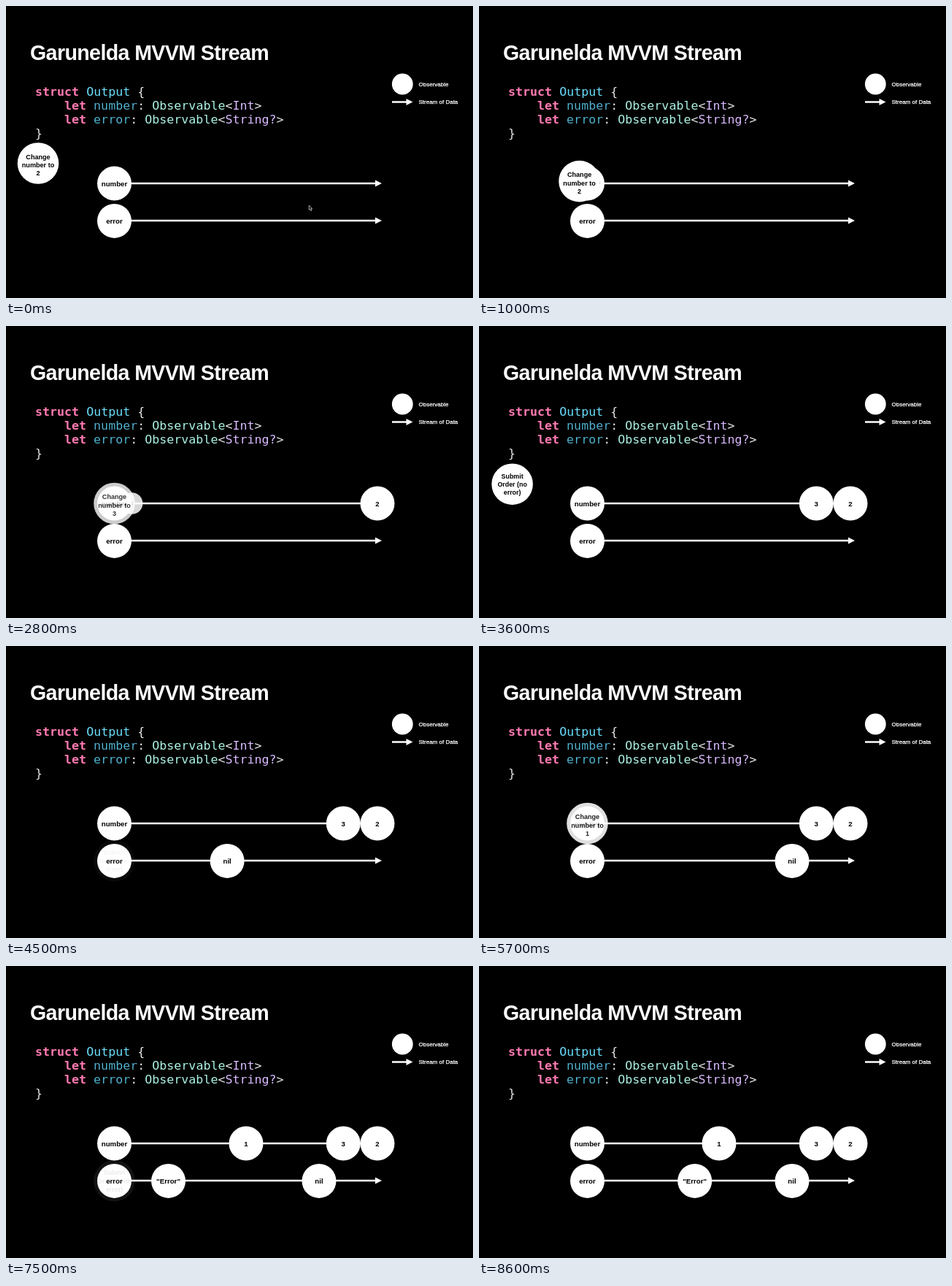
Recreate the animation shown at these times as an HTML page. Size 640 px wide and 400 px high, loop 8.7 s.

```html
<!DOCTYPE html>
<html lang="en">
<head>
<meta charset="utf-8">
<title>MVVM Stream</title>
<style>
  html, body { margin: 0; width: 100%; height: 100%; overflow: hidden; background: #000; }
  svg { display: block; width: 100%; height: 100%; }
  text { font-family: "Liberation Sans", Arial, sans-serif; white-space: pre; }
  .title { font-size: 28.6px; font-weight: 700; letter-spacing: -0.62px; fill: #fff; }
  .code text { font-family: "DejaVu Sans Mono", Menlo, monospace; font-size: 16.65px; fill: #e6e6e6; }
  .key { fill: #ff7ab2; font-weight: 700; }
  .type { fill: #6bdfff; }
  .name { fill: #4eb0cc; }
  .cls { fill: #acf2e4; }
  .std { fill: #dabaff; }
  .legend { font-size: 8px; fill: #fff; stroke: #fff; stroke-width: 0.25px; }
  .label { font-size: 9.7px; font-weight: 700; text-anchor: middle; fill: #000; }
  .note { font-weight: 700; text-anchor: middle; fill: #000; }
</style>
</head>
<body>
<svg id="stage" viewBox="0 0 640 400">
  <rect width="640" height="400"/>
  <text class="title" x="33" y="74">Garunelda MVVM Stream</text>
  <g class="code">
    <text x="40" y="123"><tspan class="key">struct</tspan> <tspan class="type">Output</tspan> {</text>
    <text x="80" y="142"><tspan class="key">let</tspan> <tspan class="name">number</tspan>: <tspan class="cls">Observable</tspan>&lt;<tspan class="std">Int</tspan>&gt;</text>
    <text x="80" y="161"><tspan class="key">let</tspan> <tspan class="name">error</tspan>: <tspan class="cls">Observable</tspan>&lt;<tspan class="std">String?</tspan>&gt;</text>
    <text x="40" y="179.5">}</text>
  </g>
  <circle cx="543.3" cy="107" r="14.4" fill="#fff"/>
  <text class="legend" x="565.5" y="109.8">Observable</text>
  <text class="legend" x="565.5" y="134.4">Stream of Data</text>
  <g id="lines"></g>
  <g id="balls"></g>
  <g id="sources"></g>
  <g id="notes"></g>
  <path id="cursor" d="M415.2 273.2v6.2l1.5-1.3 1.1 2.4 1.2-.6-1.1-2.3h1.9z" fill="#111" stroke="#ddd" stroke-width=".7"/>
</svg>
<script>
const NS = "http://www.w3.org/2000/svg";
const LOOP = 8700, MOVE = 520, ENTER = 220, FADE = 315, GROW = 160;
const HOME = { x: 44, y: 215.5 }, OFF = -29;
const SRC_X = 148.5, NUMBER_Y = 243, ERROR_Y = 294.4;
const byId = id => document.getElementById(id);

function add(parent, tag, attrs, text) {
  const el = document.createElementNS(NS, tag);
  for (const k in attrs) el.setAttribute(k, attrs[k]);
  if (text) el.textContent = text;
  return parent.appendChild(el);
}

function arrow(x1, x2, y) {
  const head = 9;
  add(byId("lines"), "path", {
    d: `M${x1} ${y}H${x2 - head + 1}`, stroke: "#fff", "stroke-width": 2.5
  });
  add(byId("lines"), "path", {
    d: `M${x2} ${y}l${-head} ${-head / 2}v${head}z`, fill: "#fff"
  });
}

function ball(parent, label) {
  const g = add(parent, "g", {});
  add(g, "circle", { r: 23.5, fill: "#fff" });
  add(g, "text", { class: "label", y: 3.6 }, label);
  return g;
}

function note(lines, size, mid) {
  const g = add(byId("notes"), "g", {});
  add(g, "circle", { r: 28.3, fill: "#fff" });
  lines.forEach((line, i) => add(g, "text", {
    class: "note", y: mid + (i - 1) * 11.3, "font-size": size
  }, line));
  return g;
}

const change = n => note(["Change", "number to", n], 9.1, 5.5);
const submit = how => note(["Submit", `Order (${how}`, "error)"], 8.9, 3.3);

arrow(529, 557.5, 131.5);
arrow(SRC_X, 515, NUMBER_Y);
arrow(SRC_X, 515, ERROR_Y - 0.4);
[["number", NUMBER_Y], ["error", ERROR_Y]].forEach(([label, y]) =>
  place(ball(byId("sources"), label), SRC_X, y, 1, 1));

// go: note leaves its resting place; emit: note fades and its ball departs
const events = [
  { note: change("2"), label: "2", y: NUMBER_Y, end: 509, go: 590, emit: 1250, resting: true },
  { note: change("3"), label: "3", y: NUMBER_Y, end: 462.3, go: 2100, emit: 2708 },
  { note: submit("no"), label: "nil", y: ERROR_Y, end: 429, go: 3560, emit: 4224 },
  { note: change("1"), label: "1", y: NUMBER_Y, end: 329, go: 4968, emit: 5628 },
  { note: submit("with"), label: "\"Error\"", y: ERROR_Y, end: 295.7, go: 6577, emit: 7240 }
];
for (const e of events) e.ball = ball(byId("balls"), e.label);

function progress(t, start, length) {
  return Math.min(1, Math.max(0, (t - start) / length));
}
function ease(t, start, length) {
  return (1 - Math.cos(Math.PI * progress(t, start, length))) / 2;
}
function mix(a, b, k) { return a + (b - a) * k; }

function place(el, x, y, scale, alpha) {
  el.setAttribute("transform", `translate(${x} ${y}) scale(${scale})`);
  el.setAttribute("opacity", alpha);
  el.setAttribute("display", alpha > 0 && scale > 0 ? "inline" : "none");
}

function draw(t) {
  for (const e of events) {
    const enter = e.resting ? 1 : ease(t, e.go - ENTER, ENTER);
    const go = ease(t, e.go, MOVE);
    place(e.note,
      mix(mix(OFF, HOME.x, enter), SRC_X, go), mix(HOME.y, e.y, go),
      1, 1 - ease(t, e.emit, FADE));
    const grow = ease(t, e.emit, GROW);
    place(e.ball, mix(SRC_X, e.end, ease(t, e.emit, MOVE)), e.y, grow, Math.min(1, grow * 1.35));
  }
  byId("cursor").setAttribute("display", t < 600 ? "inline" : "none");
}

const began = performance.now();
function tick() {
  draw((performance.now() - began) % LOOP);
  requestAnimationFrame(tick);
}
tick();
</script>
</body>
</html>
```
